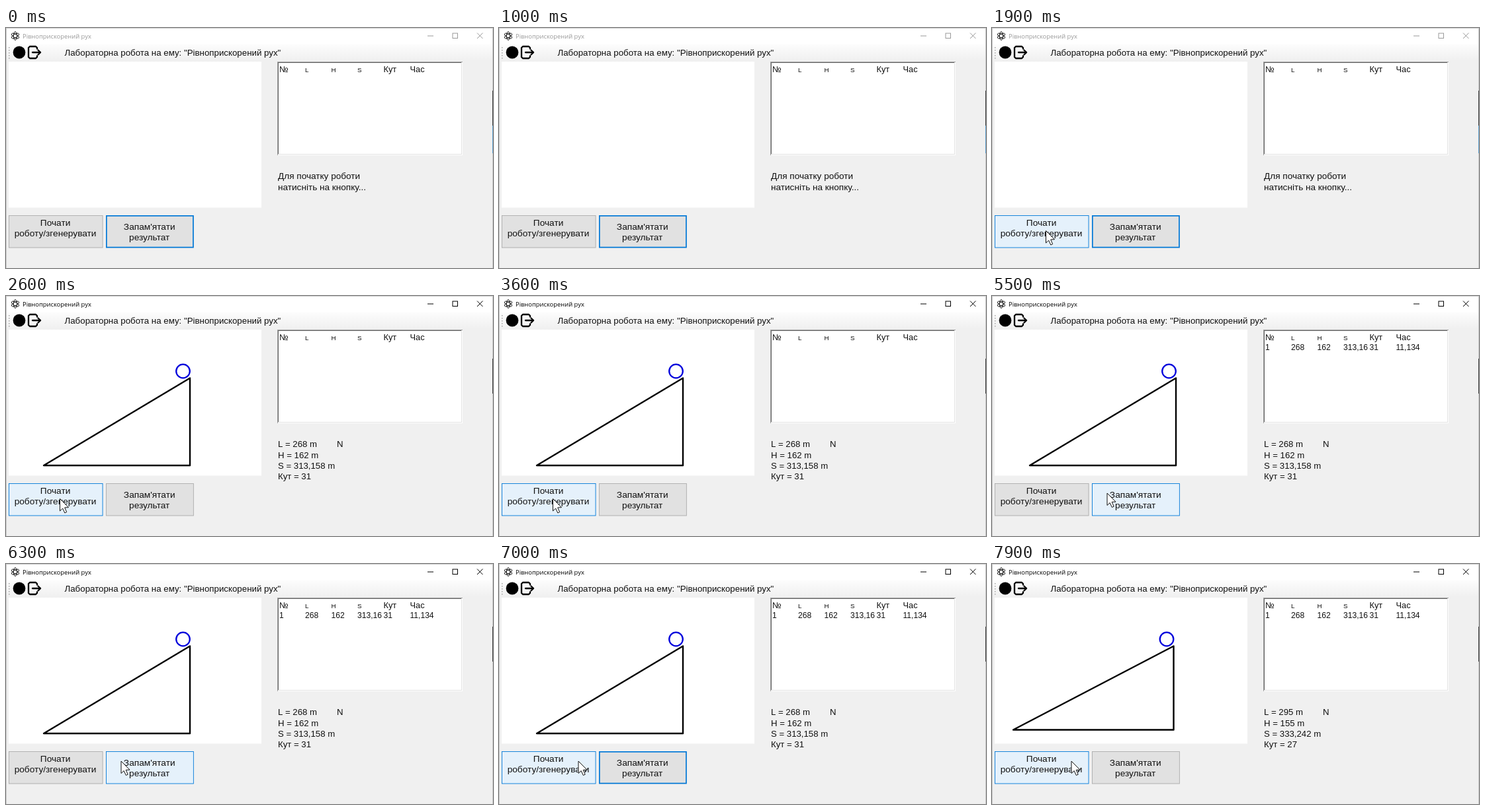
These frames come from a looping animation (736 px wide and 364 px high, 8 s). An HTML page with a canvas:

```html
<!DOCTYPE html>
<html lang="uk">
<head>
<meta charset="utf-8">
<title>Рівноприскорений рух</title>
<style>
html, body { margin: 0; width: 736px; height: 364px; overflow: hidden; background: #f0f0f0; }
canvas { display: block; }
</style>
</head>
<body>
<canvas id="stage" width="736" height="364"></canvas>
<script>
const ctx = document.getElementById('stage').getContext('2d');
const LOOP = 8000, STEP = 100;
const SANS = '"Liberation Sans", Arial, sans-serif';
const UI = '"Open Sans", "Noto Sans", sans-serif';
const BLUE = '#0078d7';

// Cursor waypoints: time, x, y
const PATH = [
  [1100, 112, 372], [1700, 81.5, 307.5], [4500, 81.5, 307.5], [4800, 156, 301.5],
  [5100, 174, 299], [6450, 174, 299], [6900, 120, 299], [8000, 120, 299]
];
const START = { x: 4, y: 284, w: 142.5, h: 49.5, lines: ['Почати', 'роботу/згенерувати'], base: 300 };
const SAVE = { x: 151, y: 284, w: 132.8, h: 49.5, lines: ["Запам'ятати", 'результат'], base: 305.5 };
const CLICKS = [{ at: 2300, btn: START }, { at: 5200, btn: SAVE }, { at: 7400, btn: START }];
const HOLD = 100;

const RUNS = [
  { left: 57, right: 278, base: 257, L: 268, H: 162, S: '313,158', angle: 31 },
  { left: 32, right: 274.5, base: 251.5, L: 295, H: 155, S: '333,242', angle: 27 }
];

function text(s, x, y, size, color = '#111', font = SANS, align = 'left') {
  ctx.font = `${size}px ${font}`;
  ctx.fillStyle = color;
  ctx.textAlign = align;
  ctx.fillText(s, x, y);
}

function rect(x, y, w, h, color) {
  ctx.fillStyle = color;
  ctx.fillRect(x, y, w, h);
}

function frame(x, y, w, h, color, line = 1) {
  ctx.strokeStyle = color;
  ctx.lineWidth = line;
  ctx.strokeRect(x + line / 2, y + line / 2, w - line, h - line);
}

function poly(points, color, line, close) {
  ctx.beginPath();
  points.forEach(([x, y]) => ctx.lineTo(x, y));
  if (close) ctx.closePath();
  ctx.strokeStyle = color;
  ctx.lineWidth = line;
  ctx.stroke();
}

function cursorAt(t) {
  if (t < PATH[0][0]) return null;
  const i = PATH.findIndex(p => p[0] > t);
  const [t0, x0, y0] = PATH[i - 1], [t1, x1, y1] = PATH[i];
  const k = (t - t0) / (t1 - t0), e = k * k * (3 - 2 * k);
  return [x0 + (x1 - x0) * e, y0 + (y1 - y0) * e];
}

function drawTitle(active) {
  const ink = active ? '#000' : '#999';
  rect(0, 0, 736, 25, '#fff');
  rect(0, 0, 736, 1, '#d4d4d4');
  ctx.strokeStyle = '#111';
  ctx.lineWidth = 1;
  for (let i = 0; i < 3; i++) {
    ctx.beginPath();
    ctx.ellipse(14, 12, 6.3, 2.7, Math.PI / 2 + i * Math.PI / 3, 0, 7);
    ctx.stroke();
  }
  text('Рівноприскорений рух', 25, 15.5, 9.4, ink, UI);
  rect(637, 11.5, 9, 1, ink);
  frame(674.5, 7.5, 8.5, 8.5, ink);
  poly([[712, 7.5], [720.5, 16]], ink, 1);
  poly([[720.5, 7.5], [712, 16]], ink, 1);
}

function drawToolbar() {
  const g = ctx.createLinearGradient(0, 25, 0, 50);
  g.addColorStop(0, '#fcfcfc');
  g.addColorStop(1, '#f0f0f0');
  rect(0, 25, 736, 25, g);
  for (let y = 29; y < 47; y += 4) rect(4, y, 1.5, 1.5, '#a5a5a5');
  ctx.beginPath();
  ctx.arc(20, 37, 9.4, 0, 7);
  ctx.fillStyle = '#000';
  ctx.fill();
  ctx.lineJoin = ctx.lineCap = 'round';
  poly([[47, 31.5], [47, 30], [45, 28], [36, 28], [34, 30], [34, 44], [36, 46], [45, 46], [47, 44], [47, 42.5]], '#000', 2.3);
  poly([[40, 37], [52, 37]], '#000', 2.3);
  poly([[48.5, 33.5], [52, 37], [48.5, 40.5]], '#000', 2.3);
  ctx.lineJoin = 'miter';
  ctx.lineCap = 'butt';
  text('Лабораторна робота на ему: "Рівноприскорений рух"', 88.5, 42, 13.3);
}

function drawScene(run) {
  rect(4, 51, 382, 221.5, '#fff');
  if (!run) return;
  const { left, right, base } = run;
  ctx.lineJoin = 'round';
  poly([[left, base], [right, base], [right, 124.5]], '#000', 2.4, true);
  ctx.lineJoin = 'miter';
  ctx.beginPath();
  ctx.arc(right - 10.5, 114, 10.3, 0, 7);
  ctx.strokeStyle = '#0000dc';
  ctx.lineWidth = 2.3;
  ctx.stroke();
}

function drawTable(saved) {
  rect(410, 51, 280, 142, '#fff');
  rect(410, 51, 280, 1, '#a0a0a0');
  rect(410, 51, 1, 142, '#a0a0a0');
  rect(411, 52, 278, 1, '#696969');
  rect(411, 52, 1, 140, '#696969');
  rect(688, 52, 1, 140, '#e3e3e3');
  rect(411, 191, 278, 1, '#e3e3e3');
  const cols = [413, 452, 491.5, 531, 570.5, 610.5];
  ['№', 'L', 'H', 'S', 'Кут', 'Час'].forEach((s, i) => {
    const small = i > 0 && i < 4;
    text(s, cols[i], 66.5, small ? 9.8 : 12.8);
  });
  if (saved) ['1', '268', '162', '313,16', '31', '11,134']
    .forEach((s, i) => text(s, cols[i], 82, 12.1));
}

function drawLabel(run) {
  const lines = run
    ? [`L = ${run.L} m`, `H = ${run.H} m`, `S = ${run.S} m`, `Кут = ${run.angle}`]
    : ['Для початку роботи', 'натисніть на кнопку...'];
  lines.forEach((s, i) => text(s, 411, 229.3 + i * 16.3, run ? 13.2 : 13.6));
  if (run) text('N', 500, 229.3, 13.2);
}

function drawButton(b, hover, focus, down) {
  const fill = down ? '#cce4f7' : hover ? '#e5f1fb' : '#e1e1e1';
  const edge = down ? '#005499' : hover || focus ? BLUE : '#adadad';
  rect(b.x, b.y, b.w, b.h, fill);
  frame(b.x, b.y, b.w, b.h, edge, focus && !hover ? 1.7 : 0.9);
  b.lines.forEach((s, i) => text(s, b.x + b.w / 2 - 0.7, b.base + i * 16.3, 13.7, '#111', SANS, 'center'));
}

function drawCursor([x, y]) {
  ctx.beginPath();
  [[0, 0], [0, 18.5], [4.2, 14.6], [7.3, 21.5], [10.2, 20.2], [7.2, 13.4], [13, 13.2]]
    .forEach(([dx, dy]) => ctx.lineTo(x + dx, y + dy));
  ctx.closePath();
  ctx.fillStyle = '#fff';
  ctx.fill();
  ctx.strokeStyle = '#111';
  ctx.lineWidth = 1;
  ctx.stroke();
}

function draw(t) {
  const pos = cursorAt(t);
  const pressed = CLICKS.filter(c => t >= c.at);
  const done = CLICKS.filter(c => t >= c.at + HOLD);
  const last = pressed[pressed.length - 1];
  const held = last && t < last.at + HOLD ? last.btn : null;
  const focus = last ? last.btn : SAVE;
  const run = RUNS[done.filter(c => c.btn === START).length - 1];
  const over = b => !!pos && pos[0] >= b.x && pos[0] < b.x + b.w && pos[1] >= b.y && pos[1] < b.y + b.h;

  rect(0, 0, 736, 364, '#f0f0f0');
  drawTitle(pressed.length > 0);
  drawToolbar();
  drawScene(run);
  drawTable(done.some(c => c.btn === SAVE));
  drawLabel(run);
  for (const b of [START, SAVE]) drawButton(b, over(b), focus === b, held === b);
  rect(0, 0, 1, 364, '#c8c8c8');
  rect(735, 0, 1, 364, '#c8c8c8');
  rect(735, 95, 1, 53, '#3a3a3a');
  if (!last) rect(735, 148, 1, 42, '#5b9bc9');
  if (pos) drawCursor(pos);
}

const begin = performance.now();
function tick() {
  const t = (performance.now() - begin) % LOOP;
  draw(Math.floor(t / STEP) * STEP);
  requestAnimationFrame(tick);
}
tick();
</script>
</body>
</html>
```
